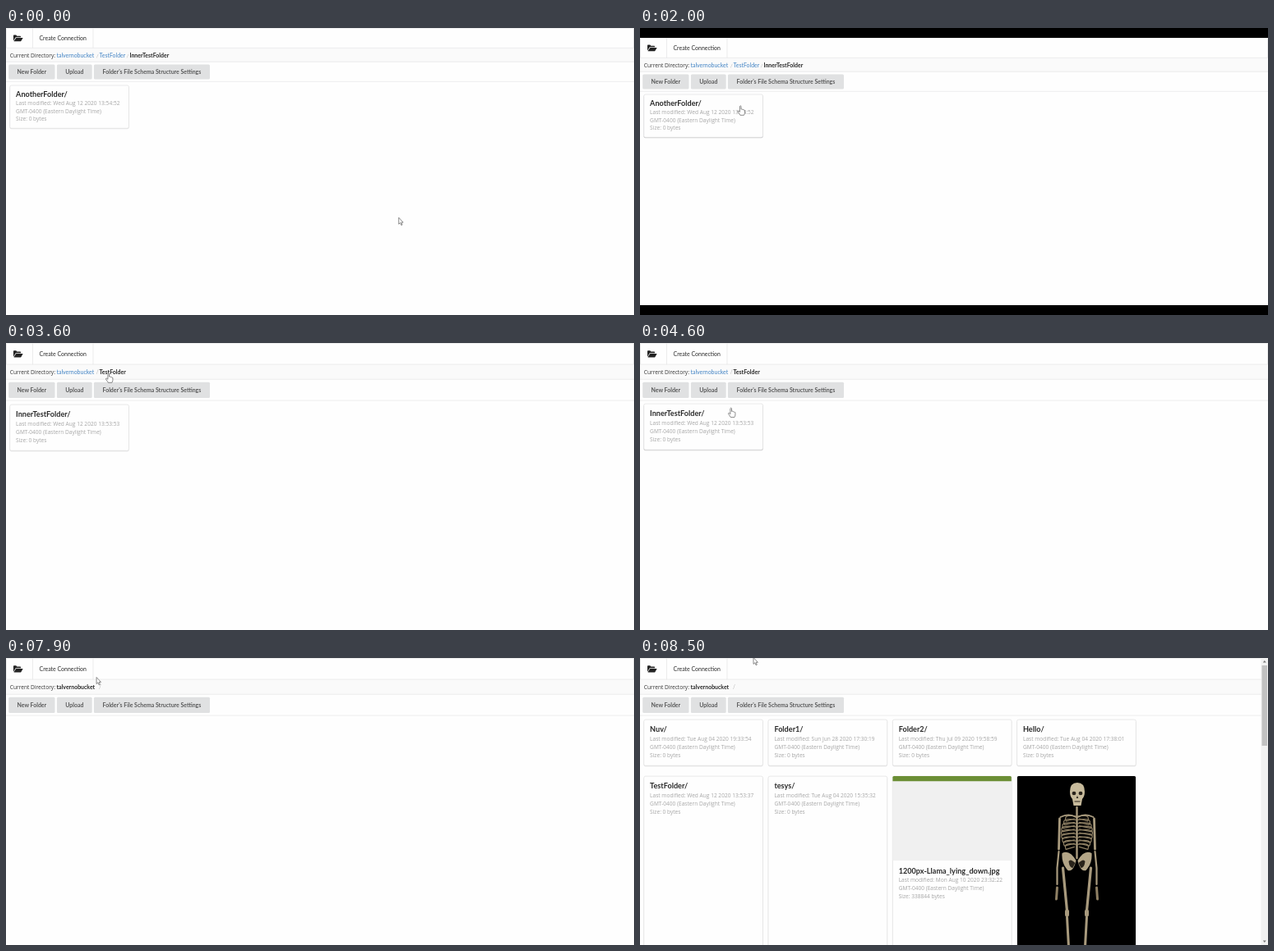
Animation, 764 px wide and 350 px high, one loop 8.6 s. Source, as an HTML page:

```html
<!DOCTYPE html>
<html lang="en">
<head>
<meta charset="utf-8">
<title>Folder browser</title>
<style>
  html, body { margin: 0; width: 100%; height: 100%; overflow: hidden; background: #fefefe; }
  svg { display: block; width: 100%; height: 100%; }
  text { font: 6.96px Lato, sans-serif; fill: rgba(0, 0, 0, .84); white-space: pre; }
  .line { stroke: #e0e0e1; stroke-width: .6; fill: none; }
  .bold, .title, .btn text { font-weight: 700; }
  .title { font-size: 9.1px; fill: rgba(0, 0, 0, .84); }
  .plain, .meta { font: 6.6px "Open Sans", "Noto Sans", sans-serif; }
  .plain { fill: rgba(0, 0, 0, .8); }
  .meta { fill: rgba(0, 0, 0, .35); }
  .link { fill: #4183c4; }
  .slash { font-size: 6.4px; fill: rgba(0, 0, 0, .28); }
  .btn rect { fill: #e0e1e2; }
  .btn.over rect { fill: #cacbcd; }
  .btn text { fill: rgba(0, 0, 0, .6); text-anchor: middle; }
  .btn.over text { fill: rgba(0, 0, 0, .8); }
  .face { fill: #fefefe; stroke: #dbdbdc; stroke-width: .6; }
  .shade { fill: #d4d4d5; opacity: .5; }
  .over > .shade { fill: #c4c4c5; opacity: .8; }
  .card.over { transform: translateY(-1px); }
  .bone { fill: none; stroke: #a89a7d; stroke-linecap: round; stroke-linejoin: round; }
  .rib { stroke: #8f8064; }
  .flesh { fill: #b3a587; }
  .skull { fill: #c8bb9c; }
  .hollow { fill: #2a241b; }
  .cursor path { fill: #fff; stroke: #5a5a5a; stroke-width: .7; stroke-linejoin: round; }
</style>
</head>
<body>
<svg viewBox="0 0 764 350" preserveAspectRatio="none">
  <g id="page">
    <rect y="24.6" width="764" height="16.6" fill="#fafafa"/>
    <path class="line" d="M.5 .4H763.5V24.3H.5ZM32.5 .4V24.3M106 .4V24.3M0 41.2H764M0 65.3H764"/>
    <path d="M9 15.8V9.3q0-.7.7-.7h2.6l1 1.1h4q.7 0 .7.7v.9h-5.6q-.8 0-1.2.7ZM9.5 16.3l2.4-3.9q.2-.4.7-.4h7.6q.5 0 .2.5l-2 3.3q-.3.5-.8.5Z" fill="#222"/>
    <text x="40.5" y="14.5">Create Connection</text>
    <text x="4.8" y="35.6" class="plain">Current Directory:</text>
    <g id="crumbs"></g>
    <g id="buttons"></g>
    <g id="lists"></g>
  </g>
  <g id="bars"><path d="M0 0H764V12H0ZM0 338H764V350H0Z"/></g>
  <g class="cursor">
    <path id="arrow" d="M.3 .2V8.2L2.1 6.6 3.4 9.5 4.6 9 3.4 6.1H5.7Z"/>
    <path id="hand" d="M-.8 1Q0-.4.8 1V4.6Q2 3.9 2.5 5 3.6 4.5 4 5.5 5.2 5.2 5.2 6.5V9Q5 10.6 4.2 11.8H-.4Q-1.4 10-3.2 7.6-3.3 6.2-2 6.7L-.8 7.8Z"/>
  </g>
</svg>
<script>
const LOOP = 8600, STRETCH = 350 / 326;
const $ = id => document.getElementById(id);
const show = (el, on) => { el.style.display = on ? '' : 'none'; };
const txt = (x, y, cls, s) => `<text x="${x}" y="${y}" class="${cls}">${s}</text>`;
const unstretch = s => `<g transform="scale(1 ${1 / STRETCH})">${s}</g>`;

const bucket = 'talvernobucket';
const zone = 'GMT-0400 (Eastern Daylight Time)';

function label(x, y, title, date, size) {
  return txt(x + 7.4, y + 14.2, 'title', title) +
    [`Last modified: ${date}`, zone, `Size: ${size} bytes`]
      .map((s, i) => txt(x + 7.4, y + 24.2 + i * 9.35, 'meta', s)).join('');
}

function card(x, y, h, inner) {
  return `<g class="card"><rect class="shade" x="${x - .2}" y="${y + .8}" width="145.2" height="${h + .2}" rx="2"/>` +
    `<rect class="face" x="${x}" y="${y}" width="144.8" height="${h}" rx="2"/>${inner}</g>`;
}

const folder = (x, y, h, title, date) => card(x, y, h, label(x, y, title, date, 0));

function skeleton() {
  const cx = 531.5;
  const bone = (w, d, cls = '') => `<path class="bone ${cls}" stroke-width="${w}" d="${d}"/>`;
  let s = '<rect x="459" y="144" width="144" height="207" rx="1.5"/>';
  s += bone(2.4, `M${cx} 182V244`);
  for (const k of [-1, 1]) {
    const at = (dx, y) => `${cx + k * dx} ${y}`;
    for (let i = 0; i < 9; i++) {
      const y = 193 + i * 4.3, w = 11 + 7 * Math.sin((i + 1) / 3.2);
      s += bone(1.2, `M${at(1, y)}Q${at(w * 1.3, y - 3)} ${at(w, y + 6)}L${at(3, y + 3)}`, 'rib');
    }
    s += bone(1.8, `M${at(1, 194)}Q${at(10, 189)} ${at(20, 194)}`) +
      bone(2.8, `M${at(21, 196)}L${at(22, 233)}`) +
      bone(2.2, `M${at(22, 236)}L${at(24, 256)}L${at(24, 276)}`) +
      bone(3, `M${at(24, 280)}L${at(25, 294)}`, 'rib') +
      bone(3.2, `M${at(17, 256)}L${at(12, 308)}`) +
      bone(5, `M${at(12, 309)}V313`) +
      bone(3, `M${at(12, 316)}L${at(10, 352)}`) +
      `<path class="flesh" d="M${at(1, 247)}Q${at(9, 233)} ${at(18, 238)}Q${at(19, 250)} ${at(11, 259)}Q${at(4, 261)} ${at(1, 247)}Z"/>` +
      `<path class="hollow" d="M${at(2, 250)}Q${at(8, 244)} ${at(10, 248)}Q${at(9, 256)} ${at(5, 256)}Z"/>`;
  }
  return s + '<path class="skull" d="M523 163Q523 152 532 152T541 163Q541 169 538 172L536.5 180H527.5L526 172Q523 169 523 163Z"/>' +
    '<path class="hollow" d="M525.6 165a2.4 2.2 0 1 1 4.8 0a2.4 2.2 0 1 1-4.8 0M533.6 165a2.4 2.2 0 1 1 4.8 0a2.4 2.2 0 1 1-4.8 0M532 168l-1.3 3h2.6ZM528.5 174.5h7v1h-7Z"/>';
}

const scrollbar = '<rect x="755.5" width="8.5" height="350" fill="#f1f1f1"/>' +
  '<rect x="756.5" y="9" width="6.5" height="98" fill="#c1c1c1"/>' +
  '<path d="M757.8 5.5h4l-2-2.5ZM757.8 344.5h4l-2 2.5Z" fill="#777"/>';

const cols = [4.7, 156, 307.3, 458.6], top1 = 70, top2 = 134.3, low = 52.3, tall = 240;
const lists = {
  inner: folder(cols[0], top1, low, 'AnotherFolder/', 'Wed Aug 12 2020 13:54:52'),
  test: folder(cols[0], top1, low, 'InnerTestFolder/', 'Wed Aug 12 2020 13:53:53'),
  root: [['Nuv/', 'Tue Aug 04 2020 19:33:54'], ['Folder1/', 'Sun Jun 28 2020 17:30:19'],
         ['Folder2/', 'Thu Jul 09 2020 19:58:59'], ['Hello/', 'Tue Aug 04 2020 17:38:01']]
      .map((f, i) => folder(cols[i], top1, low, ...f)).join('') +
    folder(cols[0], top2, tall, 'TestFolder/', 'Wed Aug 12 2020 13:53:37') +
    folder(cols[1], top2, tall, 'tesys/', 'Tue Aug 04 2020 15:35:32') +
    card(cols[2], top2, tall,
      unstretch('<rect x="307.4" y="147" width="144.4" height="100" fill="#f0f0f0"/>' +
        '<path d="M307.4 150.3V145.5q0-1.5 1.5-1.5H450.3q1.5 0 1.5 1.5v4.8Z" fill="#6b8e35"/>') +
      label(cols[2], 230.4, '1200px-Llama_lying_down.jpg', 'Mon Aug 10 2020 23:32:22', 338844)) +
    card(cols[3], top2, tall, unstretch(skeleton())) + unstretch(scrollbar)
};

const crumb = (x, cls, s) => txt(x, 35.6, cls, s);
const crumbs = {
  inner: crumb(61.5, 'link', bucket) + crumb(109.8, 'slash', '/') + crumb(113.5, 'link', 'TestFolder') +
    crumb(146.6, 'slash', '/') + crumb(150.4, 'bold', 'InnerTestFolder'),
  test: crumb(61.5, 'link', bucket) + crumb(109.8, 'slash', '/') + crumb(113.5, 'bold', 'TestFolder'),
  root: crumb(61.5, 'bold', bucket) + crumb(113, 'slash', '/')
};

const buttons = [[3.2, 56.3, 'New Folder'], [61.9, 42.8, 'Upload'], [106.9, 141.1, 'Folder\'s File Schema Structure Settings']];
$('buttons').innerHTML = buttons.map(([x, w, s]) =>
  `<g class="btn"><rect x="${x}" y="44.4" width="${w}" height="18" rx="1.5"/>${txt(x + w / 2, 55.8, '', s)}</g>`).join('');

const groups = (host, parts) => {
  host.innerHTML = Object.entries(parts).map(([k, s]) => `<g data-view="${k}">${s}</g>`).join('');
  return [...host.children];
};
const listEls = groups($('lists'), lists), crumbEls = groups($('crumbs'), crumbs);
const btnEls = [...document.querySelectorAll('.btn')];
const firstCards = ['inner', 'test'].map(v => document.querySelector(`#lists [data-view=${v}] .card`));

// time, folder, list loaded
const scenes = [[0, 'inner', 1], [3400, 'test', 0], [3600, 'test', 1], [5000, 'inner', 0], [5200, 'inner', 1],
  [6200, 'test', 0], [6400, 'test', 1], [7400, 'root', 0], [8300, 'root', 1]];

// time, screen stretch, offset
const frames = [[0, 1, 0], [100, 1, 12], [3400, STRETCH, 0]];

// time, x, y, pointer shape
const path = [[0, 477.5, 231, 'arrow'], [200, 477.5, 231, 'arrow'], [700, 435.5, 230, 'arrow'], [800, 435.5, 230, 'arrow'],
  [900, 424, 227, 'arrow'], [1000, 372, 208, 'arrow'], [1100, 338.5, 191.5, 'arrow'], [1200, 278, 175, 'arrow'],
  [1400, 195, 150, 'arrow'], [1600, 135, 112, 'hand'], [1700, 121, 102, 'hand'], [1900, 121, 102, 'hand'],
  [2300, 126, 72, 'hand'], [2700, 124.7, 45.5, 'hand'], [3300, 124.7, 45.5, 'hand'], [3400, 124.7, 36.5, 'hand'],
  [3900, 124.7, 36.5, ''], [4300, 127, 48, ''], [4400, 123, 58, 'hand'], [4600, 110.7, 78.8, 'hand'],
  [4700, 108.5, 84, 'hand'], [5000, 108.5, 84, 'arrow'], [5200, 108.5, 84, 'hand'], [5400, 110, 80, 'hand'],
  [5800, 125, 38, 'hand'], [5900, 125.7, 37, 'hand'], [6400, 125.7, 37, 'hand'], [6500, 118, 49, 'hand'],
  [6700, 103, 36, 'hand'], [6800, 101.7, 34.5, 'hand'], [7700, 101.7, 34.5, ''], [7800, 104, 31, ''],
  [7900, 109.8, 23.3, 'arrow'], [8100, 118, 14, 'arrow'], [8500, 137.7, -.8, 'arrow']];

const current = (rows, t) => rows.findLast(r => r[0] <= t);

function pointer(t) {
  const a = current(path, t), b = path[path.indexOf(a) + 1] || a;
  const k = b === a ? 0 : (t - a[0]) / (b[0] - a[0]);
  return [a[1] + (b[1] - a[1]) * k, a[2] + (b[2] - a[2]) * k, a[3]];
}

function draw(now) {
  const t = Math.floor(now % LOOP / 100) * 100;
  const [, view, loaded] = current(scenes, t);
  const [, scale, dy] = current(frames, t);
  const [x, y, shape] = pointer(t);

  $('page').setAttribute('transform', `translate(0 ${dy}) scale(1 ${scale})`);
  show($('bars'), dy > 0);
  crumbEls.forEach(g => show(g, g.dataset.view === view));
  listEls.forEach(g => show(g, loaded && g.dataset.view === view));

  const py = (y - dy) / scale;
  const over = (x0, w, y0, h) => shape !== '' && x >= x0 && x <= x0 + w && py >= y0 && py <= y0 + h;
  btnEls.forEach((b, i) => b.classList.toggle('over', over(buttons[i][0], buttons[i][1], 44.4, 18)));
  firstCards.forEach(c => c.classList.toggle('over', over(cols[0], 144.8, top1, low)));

  for (const id of ['arrow', 'hand']) {
    show($(id), id === shape);
    $(id).setAttribute('transform', `translate(${x} ${y})`);
  }
}

let start;
function tick(now) {
  start ??= now;
  draw(now - start);
  requestAnimationFrame(tick);
}
draw(0);
requestAnimationFrame(tick);
</script>
</body>
</html>
```
